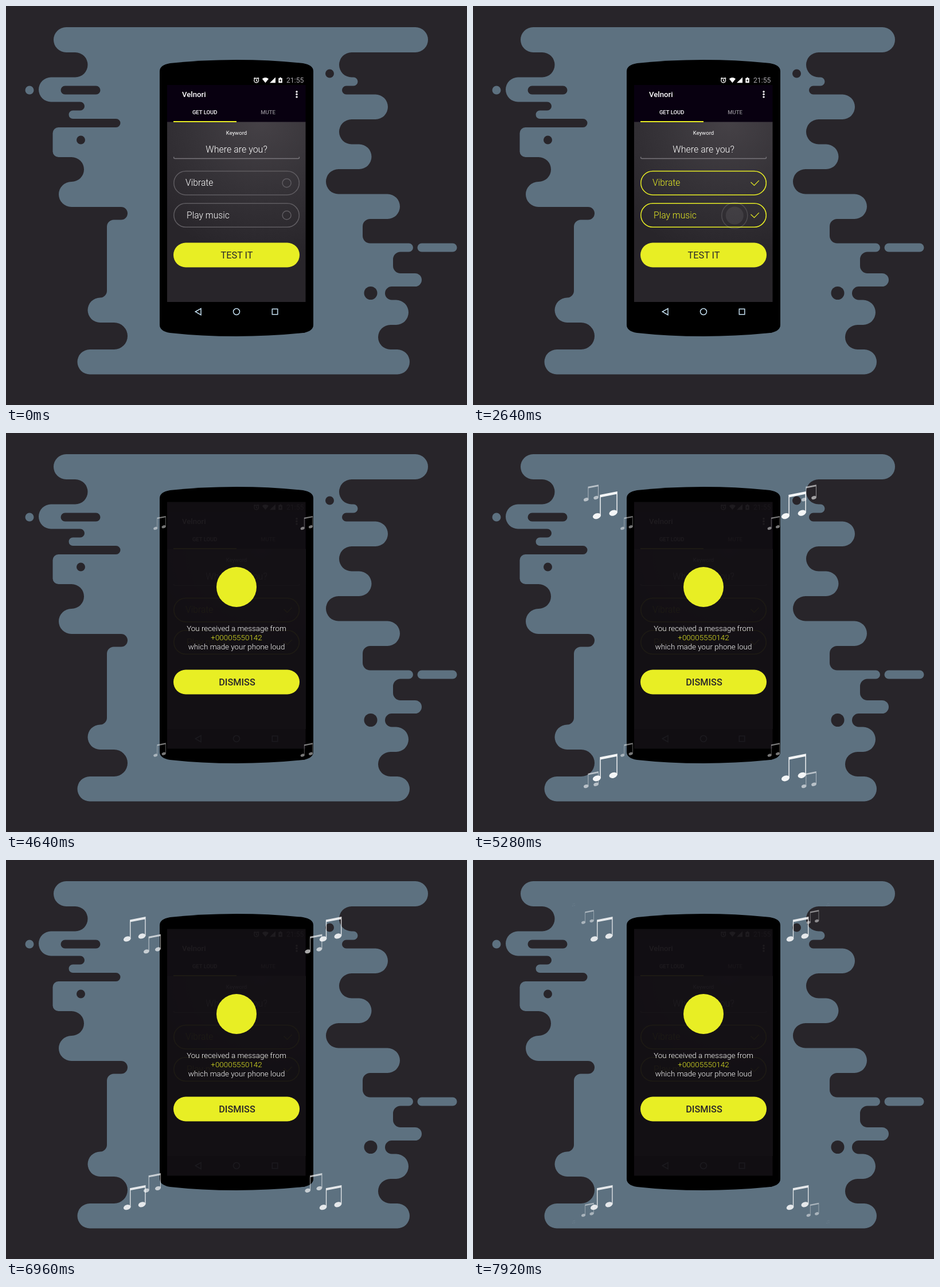
Animation, 804 px wide and 697 px high, one loop 8000 ms. Source, as an HTML page:

```html
<!DOCTYPE html>
<html lang="en">
<head>
<meta charset="utf-8">
<title>Phone alert</title>
<style>
  html, body { margin: 0; width: 100%; height: 100%; overflow: hidden; background: #28252a; }
  svg { display: block; width: 100vw; height: 100vh; }
  text { font-family: Roboto, sans-serif; fill: #fff; }
  .mid { text-anchor: middle; }
  .light { font-weight: 300; }
  .line { fill: none; stroke: #5f5c61; stroke-width: 1.5; }
</style>
</head>
<body>
<svg viewBox="0 0 804 697">
  <defs>
    <radialGradient id="glow" gradientUnits="userSpaceOnUse" cx="445" cy="198" r="240">
      <stop offset="0" stop-color="#464247"/>
      <stop offset=".5" stop-color="#363338"/>
      <stop offset="1" stop-color="#28252a"/>
    </radialGradient>
    <g id="note" fill="#fff">
      <ellipse cx="7.6" cy="47.3" rx="7.9" ry="5.3" transform="rotate(-18 7.6 47.3)"/>
      <ellipse cx="39" cy="41.3" rx="7.9" ry="5.3" transform="rotate(-18 39 41.3)"/>
      <path d="M13.5 6.5 47 0V41H45.4V5.3L15.1 11.2V47H13.5Z"/>
    </g>
  </defs>

  <rect width="804" height="697" fill="#28252a"/>
  <g fill="#5d7180">
    <path id="blob"/>
    <circle cx="41" cy="147" r="7.5"/>
    <rect x="717.5" y="414.5" width="69" height="15" rx="7.5"/>
  </g>
  <g fill="#28252a">
    <rect x="95.5" y="139.5" width="69" height="15" rx="7.5"/>
    <circle cx="130.5" cy="234" r="7.5"/>
    <circle cx="564.5" cy="118" r="7.5"/>
    <circle cx="636" cy="501.5" r="11.5"/>
  </g>

  <path d="M268 114Q268 103 286 100 340 94 402 94 464 94 518 100 536 103 536 114V557Q536 568 518 571 464 577 402 577 340 577 286 571 268 568 268 557Z"/>
  <rect x="281" y="138" width="241.5" height="65" fill="#080010"/>
  <rect x="281" y="202.5" width="241.5" height="314.5" fill="url(#glow)"/>

  <g fill="none" stroke="#fff" stroke-width="1.3">
    <circle cx="436.7" cy="130" r="3.9"/>
    <path d="M436.7 127.5V130.3L438.6 131.5M432.2 127 434.4 125.1M441.2 127 439 125.1"/>
  </g>
  <path fill="#fff" d="M446.8 127.2Q452.4 122.6 458 127.2L452.4 134.2ZM470 124.5V134.2H460ZM475.3 126H477.2V124.8H480V126H481.8V134.2H475.3Z"/>
  <path d="M479.4 127.2 476.6 130.7H478.4L477.8 133 480.6 129.7H478.8Z"/>
  <text x="489" y="134" font-size="12.2" style="fill:#aaa8ad">21:55</text>
  <text x="307" y="159" font-size="13.2" font-weight="500">Velnori</text>
  <g fill="#fff">
    <circle cx="507" cy="149.7" r="1.7"/><circle cx="507" cy="154.3" r="1.7"/><circle cx="507" cy="158.9" r="1.7"/>
  </g>
  <text class="mid" x="346.7" y="189" font-size="9.5" font-weight="500">GET LOUD</text>
  <text class="mid" x="457" y="189" font-size="9.5" font-weight="500" style="fill:#8b878f">MUTE</text>
  <rect x="292" y="201" width="110" height="2" fill="#e8ee24"/>

  <text class="mid" x="402" y="225.3" font-size="9.5">Keyword</text>
  <text class="mid light" x="402" y="256" font-size="16">Where are you?</text>
  <path class="line" style="stroke:#77747a" d="M292.7 263.5V265Q292.7 266.6 294.5 266.6H509.7Q511.4 266.6 511.4 265V263.5"/>
  <g id="options"></g>

  <g fill="none" stroke="#c4dff0" stroke-width="1.5">
    <path d="M330.3 534 340 528.5V539.6Z"/>
    <circle cx="402" cy="534" r="5.5"/>
    <rect x="464.3" y="529.3" width="9.5" height="9.5"/>
  </g>

  <rect id="shade" x="281" y="120.5" width="241.5" height="431" fill="#120f13"/>
  <g id="alert">
    <circle cx="402" cy="269" r="35" fill="#e8ee24"/>
    <g class="mid light" font-size="13.4">
      <text x="402" y="346">You received a message from</text>
      <text x="402" y="362" style="fill:#e8ee24">+00005550142</text>
      <text x="402" y="378">which made your phone loud</text>
    </g>
  </g>
  <rect id="button" x="292" y="413.5" width="220" height="43" rx="21.5" fill="#e8ee24"/>
  <text id="test" class="mid" x="402.5" y="440.5" font-size="16.3" style="fill:#28252a">TEST IT</text>
  <text id="dismiss" class="mid" x="403" y="440.5" font-size="16.3" font-weight="500" style="fill:#28252a">DISMISS</text>
  <g id="touches"></g>
  <g id="notes"></g>
</svg>

<script>
const LOOP = 8000, STEP = 80;
const $ = id => document.getElementById(id);
const ramp = (t, a, b) => Math.min(1, Math.max(0, (t - a) / (b - a)));
const mix = (a, b, k) => a + (b - a) * k;

function add(parent, tag, attrs) {
  const el = document.createElementNS('http://www.w3.org/2000/svg', tag);
  set(el, attrs);
  return parent.appendChild(el);
}
function set(el, attrs) {
  for (const k in attrs) el.setAttribute(k, attrs[k]);
}

// Vertical edges of the backdrop, clockwise: x, start y, end y, optional corner radius.
const edges = [
  [736, 37, 81], [581, 81, 124.5], [613.5, 124.5, 139.5], [586, 139.5, 154.5],
  [666, 154.5, 198], [581, 198, 241.5], [637.5, 241.5, 285], [558, 285, 328.5],
  [687, 328.5, 372], [622, 372, 414.5, 13], [710, 414.5, 429.5], [675, 429.5, 467, 13],
  [725, 467, 490], [661, 490, 513.5], [702, 513.5, 557], [649, 557, 600], [704, 600, 643.5],
  [124.5, 643.5, 600], [212, 600, 553], [142.5, 553, 509.5], [176, 509.5, 373.5, 12],
  [212, 373.5, 351], [92, 351, 307], [136, 307, 264], [81.5, 264, 212, 10],
  [199.5, 212, 197], [109.5, 197, 182.5], [137, 182.5, 167.5], [57, 167.5, 124.5],
  [142.5, 124.5, 81], [83, 81, 37]
];
function outline() {
  const n = edges.length;
  return edges.map(([x, y0, y1, r], i) => {
    const dy = Math.sign(y1 - y0);
    const dIn = Math.sign(x - edges[(i + n - 1) % n][0]);
    const dOut = Math.sign(edges[(i + 1) % n][0] - x);
    r = r || Math.abs(y1 - y0) / 2;
    const arc = turn => `A${r} ${r} 0 0 ${turn > 0 ? 1 : 0} `;
    return `${i ? 'L' : 'M'}${x - dIn * r} ${y0}${arc(dIn * dy)}${x} ${y0 + dy * r}` +
      `V${y1 - dy * r}${arc(-dy * dOut)}${x + dOut * r} ${y1}`;
  }).join('') + 'Z';
}
set($('blob'), { d: outline() });

function option(label, x, y) {
  const draw = color => {
    const g = add($('options'), 'g', {});
    add(g, 'rect', { class: 'line', x: 292.8, y: y - 20.7, width: 218.5, height: 41.4, rx: 20.7 });
    const text = add(g, 'text', { class: 'light', x, y: y + 5, 'font-size': 15.7 });
    text.textContent = label;
    if (color) {
      g.firstChild.style.stroke = text.style.fill = color;
      add(g, 'path', { d: `M484.5 ${y - 1.5}l6 5.7 8.3-8.6`, fill: 'none', stroke: color, 'stroke-width': 1.2 });
    } else {
      add(g, 'circle', { class: 'line', cx: 489.6, cy: y, r: 7.5 });
    }
    return g;
  };
  return { off: draw(), on: draw('#e8ee24') };
}
const options = [
  { ...option('Vibrate', 313, 309.2), at: 1280 },
  { ...option('Play music', 315, 365.5), at: 2080 }
];

const touches = [[880, 312], [1680, 366], [3280, 446]].map(([start, cy]) => {
  const g = add($('touches'), 'g', {});
  const ring = (fill, stroke) => add(g, 'circle', { cx: 456.3, cy, fill, stroke, 'stroke-width': 1.5 });
  return { start, g, disc: ring('#fff', 'none'), ring: ring('none', '#fff'), wave: ring('none', '#fff') };
});

function drawTouch({ start, g, disc, ring, wave }, t) {
  const age = t - start;
  const press = ramp(age, 240, 480) - ramp(age, 800, 960);
  const spread = ramp(age, 480, 800);
  set(g, { opacity: age < 0 ? 0 : ramp(age, -80, 320) * (1 - ramp(age, 800, 1200)) });
  set(disc, { r: mix(15.5, 14, press), opacity: 0.13 });
  set(ring, { r: mix(22.5, 19, press), opacity: mix(0.24, 0.36, press) });
  set(wave, { r: mix(19, 36, 1 - (1 - spread) ** 2), opacity: spread ? 0.35 * (1 - spread) : 0 });
}

// Bursts of four notes leave each corner; each one swells, then drifts off.
const PEAK = 4880, GAP = 320, BURST = 1920;
const entryX = [295, 281.5, 268, 255, 243.5, 236.5];
const notes = [];
for (let i = 0; i < 8; i++) {
  for (let corner = 0; corner < 4; corner++) {
    const el = add($('notes'), 'use', { href: '#note' });
    notes.push({ el, right: corner % 2, low: corner > 1, peak: PEAK + (i >> 2) * BURST + (i % 4) * GAP });
  }
}

function drawNote({ el, right, low, peak }, t) {
  const p = (t - peak) / STEP;
  if (p < -5 || p > 10) return set(el, { opacity: 0 });
  let x, y, size;
  if (p < 0) {
    const i = Math.floor(p + 5);
    x = mix(entryX[i], entryX[i + 1], p + 5 - i);
    y = 131.5 + (x - 236.5) * 0.81;
    size = 47 + p * 8.5;
  } else {
    x = 236.5 - p * 6.1;
    y = 131.5 - p * 5.33;
    size = 47 - p * 4.22;
  }
  if (right) x = 795 - 0.12 * size - x;
  if (low) y = 710.5 - y;
  const k = size / 47;
  set(el, {
    opacity: Math.min(1, k * 1.03),
    transform: `translate(${x} ${y}) scale(${k}) translate(-23.5 -26.5)`
  });
}

function draw(t) {
  for (const { on, off, at } of options) {
    const k = ramp(t, at, at + 160);
    set(on, { opacity: k });
    set(off, { opacity: 1 - k });
  }
  const open = ramp(t, 4080, 4400);
  set($('shade'), { opacity: open * 0.95 });
  set($('alert'), { opacity: open });
  set($('test'), { opacity: 1 - open });
  set($('dismiss'), { opacity: open });
  const pressed = ramp(t, 3600, 3760) - ramp(t, 3920, 4080);
  set($('button'), { fill: `rgb(${232 - 14 * pressed},${238 - 14 * pressed},36)` });
  touches.forEach(touch => drawTouch(touch, t));
  notes.forEach(note => drawNote(note, t));
}

const begin = performance.now();
function tick() {
  const t = (performance.now() - begin) % LOOP;
  draw(Math.floor(t / STEP) * STEP);
  requestAnimationFrame(tick);
}
tick();
</script>
</body>
</html>
```
